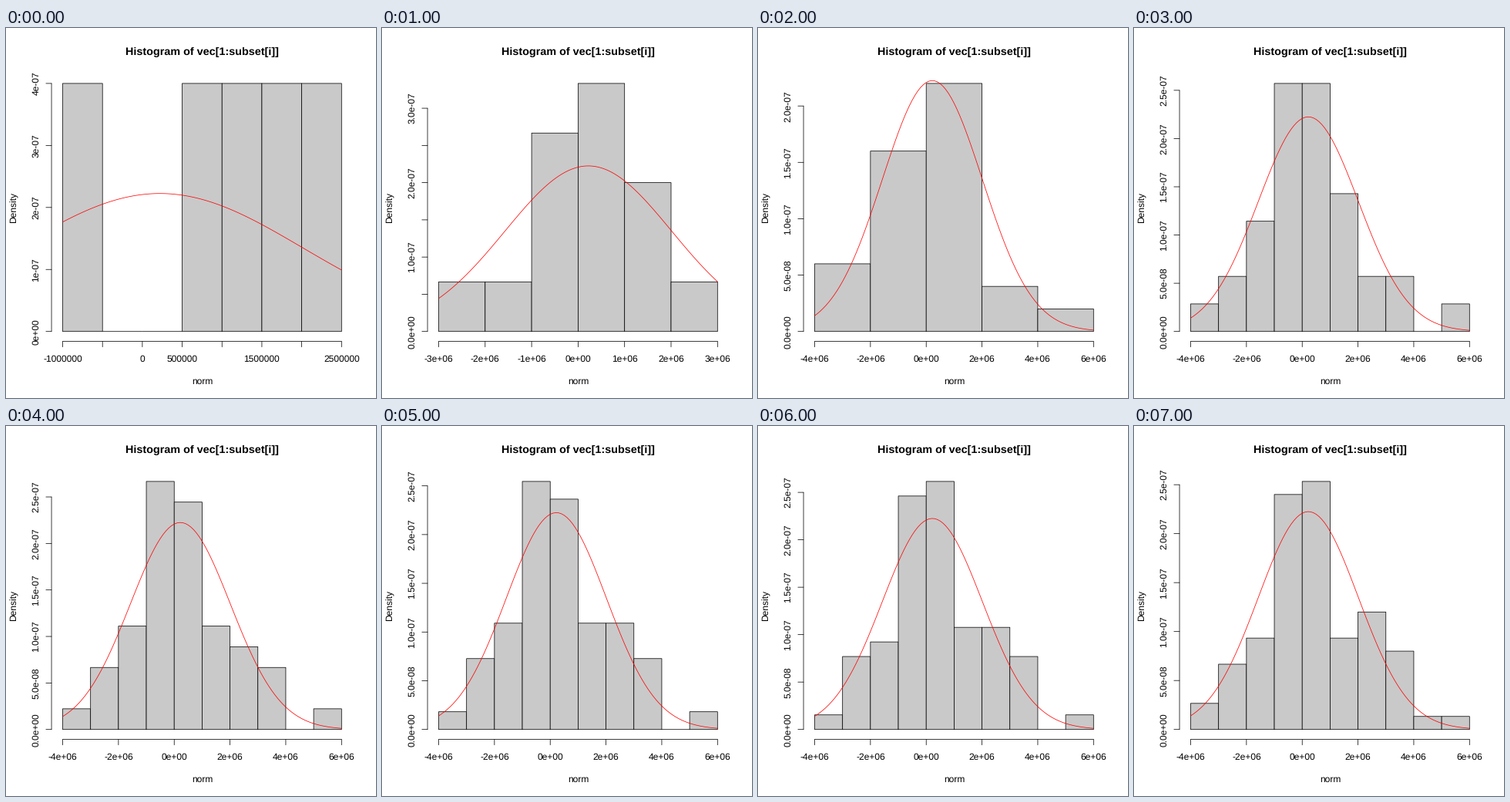
Animation, 480 px wide and 480 px high, one loop 8000 ms. Source, as a matplotlib script:

```python
import numpy as np
import matplotlib
import matplotlib.pyplot as plt
from matplotlib.animation import FuncAnimation
from matplotlib.patches import Rectangle

matplotlib.rcParams.update({
    "font.family": "Liberation Sans",
    "font.size": 12,
    "text.hinting": "none",
    "axes.unicode_minus": False,
})

SIZE = 480
LINE = 14.4                      # height of one margin line
LEFT, RIGHT = 4.1 * LINE, SIZE - 2.1 * LINE
TOP, BOTTOM = 4.1 * LINE, SIZE - 5.1 * LINE
PAD = 0.04 / 1.08                # share of the plot region left free per side
X0, X1 = LEFT + PAD * (RIGHT - LEFT), RIGHT - PAD * (RIGHT - LEFT)
Y0, Y1 = BOTTOM - PAD * (BOTTOM - TOP), TOP + PAD * (BOTTOM - TOP)
TICK = LINE / 2
STROKE = 0.75
MEAN, SD = 2.2e5, 1.793e6

# first break, bin width, counts per bin; the sample grows by ten each step
STEPS = [
    (-1e6, 5e5, [1, 0, 0, 1, 1, 1, 1]),
    (-3e6, 1e6, [1, 1, 4, 5, 3, 1]),
    (-4e6, 2e6, [3, 8, 11, 2, 1]),
    (-4e6, 1e6, [1, 2, 4, 9, 9, 5, 2, 2, 0, 1]),
    (-4e6, 1e6, [1, 3, 5, 12, 11, 5, 4, 3, 0, 1]),
    (-4e6, 1e6, [1, 4, 6, 14, 13, 6, 6, 4, 0, 1]),
    (-4e6, 1e6, [1, 5, 6, 16, 17, 7, 7, 5, 0, 1]),
    (-4e6, 1e6, [2, 5, 7, 18, 19, 7, 9, 6, 1, 1]),
]

fig = plt.figure(figsize=(SIZE / 72, SIZE / 72), dpi=72, facecolor="white")
ax = fig.add_axes([0, 0, 1, 1])


def line(xs, ys, color="black"):
    ax.plot(xs, ys, color=color, lw=STROKE, snap=False,
            solid_capstyle="round", solid_joinstyle="round")


def label(x, y, text, **style):
    ax.text(x, y, text, ha="center", va="baseline",
            rotation_mode="anchor", **style)


def x_axis(ticks, to_px, step):
    line([to_px(ticks[0]), to_px(ticks[-1])], [BOTTOM, BOTTOM])
    for v in ticks:
        line([to_px(v)] * 2, [BOTTOM, BOTTOM + TICK])
        if step > 0:
            label(to_px(v), 432.9, f"{v:.0e}")
        elif v in (-1e6, 0, 5e5, 1.5e6, 2.5e6):
            label(to_px(v), 432.9, f"{v:.0f}")


def y_axis(ticks, to_px, step):
    digits = 0 if step == 0 else 1
    skip = 2 if step == 1 else 1
    line([LEFT, LEFT], [to_px(ticks[0]), to_px(ticks[-1])])
    for k, v in enumerate(ticks):
        line([LEFT - TICK, LEFT], [to_px(v)] * 2)
        if k % skip == 0:
            label(42.3, to_px(v), f"{v:.{digits}e}", rotation=90)


def draw(step):
    ax.clear()
    ax.set_xlim(0, SIZE)
    ax.set_ylim(SIZE, 0)
    ax.axis("off")

    start, width, counts = STEPS[step]
    density = np.array(counts) / (sum(counts) * width)
    end = start + width * len(counts)
    peak = density.max()

    def px(v):
        return X0 + (v - start) / (end - start) * (X1 - X0)

    def py(v):
        return Y0 + v / peak * (Y1 - Y0)

    for k, d in enumerate(density):
        left = px(start + k * width)
        ax.add_patch(Rectangle(
            (left, Y0), px(start + (k + 1) * width) - left, py(d) - Y0,
            fc="#c9c9c9", ec="black", lw=STROKE, joinstyle="round",
            snap=False))

    x_gap = 2e6 if step > 1 else width
    x_axis(np.arange(start, end + 1, x_gap), px, step)
    y_gap = 1e-7 if step == 0 else 5e-8
    y_axis(np.arange(int(peak / y_gap + 1e-6) + 1) * y_gap, py, step)

    xs = np.linspace(start, end, 101)
    bell = np.exp(-((xs - MEAN) / SD) ** 2 / 2) / (SD * np.sqrt(2 * np.pi))
    line(px(xs), py(bell), "#ff0000")

    mid_x, mid_y = (LEFT + RIGHT) / 2, (TOP + BOTTOM) / 2
    label(mid_x, 34.8, "Histogram of vec[1:subset[i]]",
          fontsize=14.4, fontweight="bold")
    label(mid_x, 461.8, "norm")
    label(13.3, mid_y, "Density", rotation=90)
    return []


anim = FuncAnimation(fig, draw, frames=len(STEPS), interval=1000,
                     init_func=lambda: draw(0), repeat=True, repeat_delay=0,
                     blit=False)
plt.show()
```
